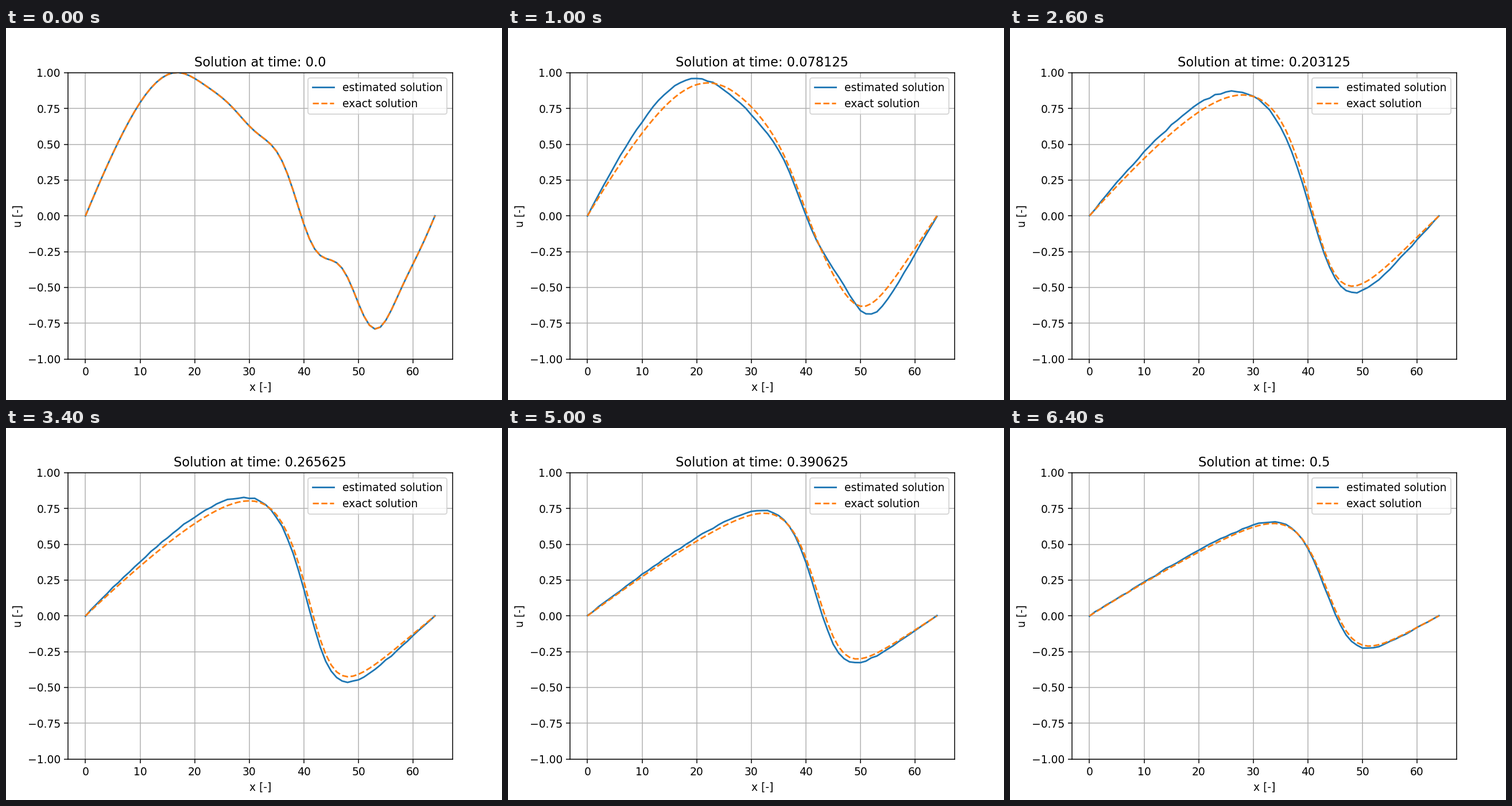
Animation, 864 px wide and 648 px high, one loop 6.6 s. Source, as a matplotlib script:

```python
import numpy as np
import matplotlib.pyplot as plt
from matplotlib.animation import FuncAnimation

CELLS = 64
FRAMES = 33
SUBSTEPS = 32               # solver steps per frame
DX = 1 / CELLS
DT = 1 / (CELLS * SUBSTEPS)
NU = 0.025                  # viscosity

# Amplitudes of sin(pi x), sin(2 pi x), ... in the initial state
AMPS = [0.425, 0.761, -0.138, 0.118, -0.018, -0.003, -0.020,
        -0.005, 0.036, -0.041, 0.018, 0.016, -0.023, 0.009]

nodes = np.arange(CELLS + 1)


def solve_burgers():
    """March Burgers' equation with left-sided fluxes and fixed zero ends."""
    u = sum(a * np.sin(k * np.pi * nodes * DX) for k, a in enumerate(AMPS, 1))
    u[[0, -1]] = 0
    history = [u]
    for _ in range((FRAMES - 1) * SUBSTEPS):
        flux = u ** 2 / 2
        u = u.copy()
        u[1:-1] += DT * (NU * np.diff(u, 2) / DX ** 2
                         - np.diff(flux)[:-1] / DX)
        history.append(u)
    return history


history = solve_burgers()


def solution(t):
    return history[round(t / DT)]


def lag(t):
    """How far the estimate trails: builds up fast, then slowly closes."""
    return 0.045 * (1 - np.exp(-t / 0.05)) * (1 - (t / 0.65) ** 2)


# Small ripples on the estimate that drift in time and vanish at the start
rng = np.random.default_rng(4)
noise = rng.normal(0, 0.004, (FRAMES + 2, CELLS + 1))
ripple = (noise[:-2] + noise[1:-1] + noise[2:]) / 3
ripple[0] = 0

fig, ax = plt.subplots(figsize=(6.4, 4.8), dpi=135)
est_line, = ax.plot(nodes, solution(0), label="estimated solution")
exact_line, = ax.plot(nodes, solution(0), "--", label="exact solution")
ax.set_xlim(-3.2, 67.2)
ax.set_ylim(-1, 1)
ax.set_xlabel("x [-]")
ax.set_ylabel("u [-]")
ax.grid()
ax.legend(loc="upper right")
title = ax.set_title("Solution at time: 0.0")


def update(i):
    t = i / CELLS
    est_line.set_ydata(solution(t - lag(t)) + ripple[i])
    exact_line.set_ydata(solution(t))
    title.set_text(f"Solution at time: {t}")
    return est_line, exact_line, title


anim = FuncAnimation(fig, update, frames=FRAMES, interval=200, repeat=True)
plt.show()
```
